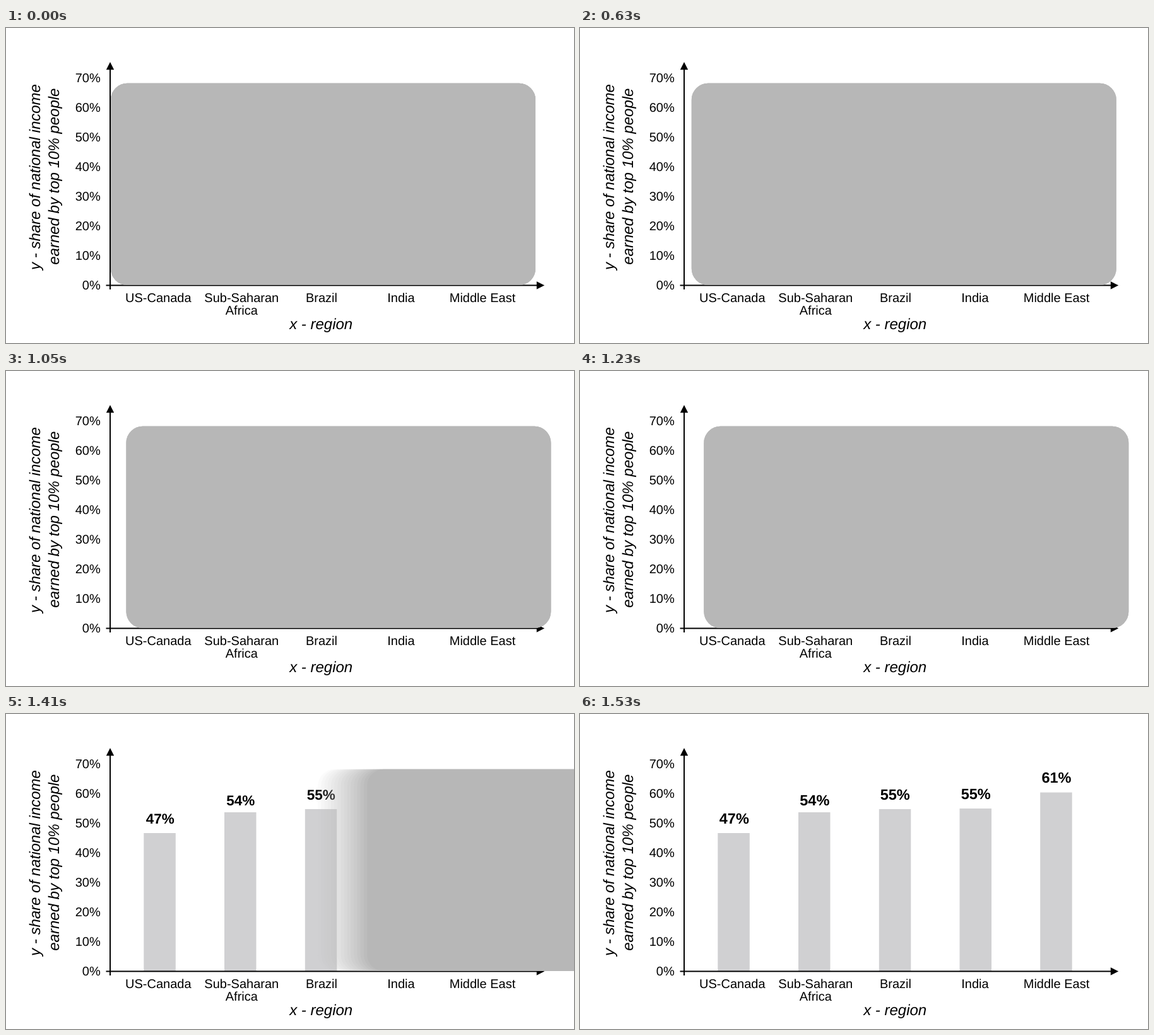
These frames come from a looping animation (900 by 500 pixels, 3600 ms). An HTML page:

```html
<!DOCTYPE html>
<html lang="en">
<head>
<meta charset="utf-8">
<title>Income share by region</title>
<style>
  html, body { margin: 0; width: 100%; height: 100%; overflow: hidden; background: #fff; }
  svg { display: block; width: 900px; height: 500px; }
  text { font-family: "Liberation Sans", Arial, sans-serif; font-size: 20px; text-anchor: middle; text-rendering: geometricPrecision; }
  .title { font-size: 24px; font-style: italic; }
  .value { font-weight: bold; }
  .tick { text-anchor: end; }
</style>
</head>
<body>
<svg id="stage" viewBox="0 0 900 500" xmlns="http://www.w3.org/2000/svg">
  <g id="bars" fill="#d0d0d2"></g>
  <path d="M165 62V415M158.500 408.500H845" stroke="#000" stroke-width="2" fill="none"/>
  <path d="M165 54l6.200 12.300h-12.400zM853.200 408.500l-12.400 6.200v-12.400z"/>
  <g id="labels"></g>
  <text class="title" x="499.200" y="478">x - region</text>
  <text class="title" transform="translate(54 236.500) rotate(-90)">y - share of national income</text>
  <text class="title" transform="translate(83.500 235.700) rotate(-90)">earned by top 10% people</text>
  <g id="cover" fill="#b7b7b7"></g>
</svg>
<script>
const LOOP = 3600, STEP = 30, SHUTTER = 15, SAMPLES = 16;
const DRIFT_START = 300, SWIPE_START = 1350, SETTLE = 1530;
const COVER = { x: 166, top: 87.8, bottom: 408, width: 673, r: 26 };

const regions = [
  { name: ["US-Canada"], x: 241.3, bar: 218.3, top: 189, value: "47%", valueX: 244.3, valueY: 173.5 },
  { name: ["Sub-Saharan", "Africa"], x: 373.3, bar: 346, top: 156, value: "54%", valueX: 371.8, valueY: 144.7 },
  { name: ["Brazil"], x: 500, bar: 473.8, top: 151, value: "55%", valueX: 499.2, valueY: 135.6 },
  { name: ["India"], x: 626, bar: 601.5, top: 150, value: "55%", valueX: 627.2, valueY: 135 },
  { name: ["Middle East"], x: 755, bar: 729.2, top: 124.5, value: "61%", valueX: 755, valueY: 109 }
];

const byId = id => document.getElementById(id);

function add(parent, tag, attrs, content = "") {
  const el = document.createElementNS("http://www.w3.org/2000/svg", tag);
  for (const key in attrs) el.setAttribute(key, attrs[key]);
  el.textContent = content;
  parent.appendChild(el);
  return el;
}

for (let i = 0; i <= 7; i++) {
  add(byId("labels"), "text", { class: "tick", x: 149.7, y: 415.3 - 47 * i }, i * 10 + "%");
}

const values = regions.map(g => {
  add(byId("bars"), "rect", { x: g.bar, y: g.top, width: 50.5, height: 408 - g.top });
  g.name.forEach((line, i) => add(byId("labels"), "text", { x: g.x, y: 435.3 + 19.8 * i }, line));
  return add(byId("labels"), "text", { class: "value", x: g.valueX, y: g.valueY }, g.value);
});

// Each half stacks its samples, outermost first, so that the opacities add up to an even average.
const slices = Array.from({ length: SAMPLES }, (_, i) => {
  const opacity = { "fill-opacity": 1 / (SAMPLES - i) };
  return { left: add(byId("cover"), "path", opacity), right: add(byId("cover"), "path", opacity) };
});

function coverX(t) {
  const drift = Math.max(0, Math.min(t, SWIPE_START) - DRIFT_START) * 0.0326;
  const swipe = Math.max(0, t - SWIPE_START) * 5.55;
  return COVER.x + drift + swipe;
}

function halfPath(edge, middle, dir) {
  const { top, bottom, r } = COVER;
  const sweep = dir > 0 ? 0 : 1;
  return `M${middle} ${top}H${edge + dir * r}a${r} ${r} 0 0 ${sweep} ${-dir * r} ${r}` +
    `V${bottom - r}a${r} ${r} 0 0 ${sweep} ${dir * r} ${r}H${middle}z`;
}

function draw(t) {
  const middle = Math.round(coverX(t) + COVER.width / 2);
  slices.forEach((slice, i) => {
    const offset = SHUTTER * ((i + 0.5) / SAMPLES - 0.5);
    slice.left.setAttribute("d", halfPath(coverX(t + offset), middle, 1));
    slice.right.setAttribute("d", halfPath(coverX(t - offset) + COVER.width, middle, -1));
  });
  byId("cover").setAttribute("visibility", t < SETTLE ? "visible" : "hidden");
  const size = t < SETTLE ? 22.5 : 23.5;
  values.forEach(el => { el.style.fontSize = size + "px"; });
}

const start = performance.now();
function tick() {
  const t = (performance.now() - start) % LOOP;
  draw(Math.floor(t / STEP) * STEP);
  requestAnimationFrame(tick);
}
tick();
</script>
</body>
</html>
```
